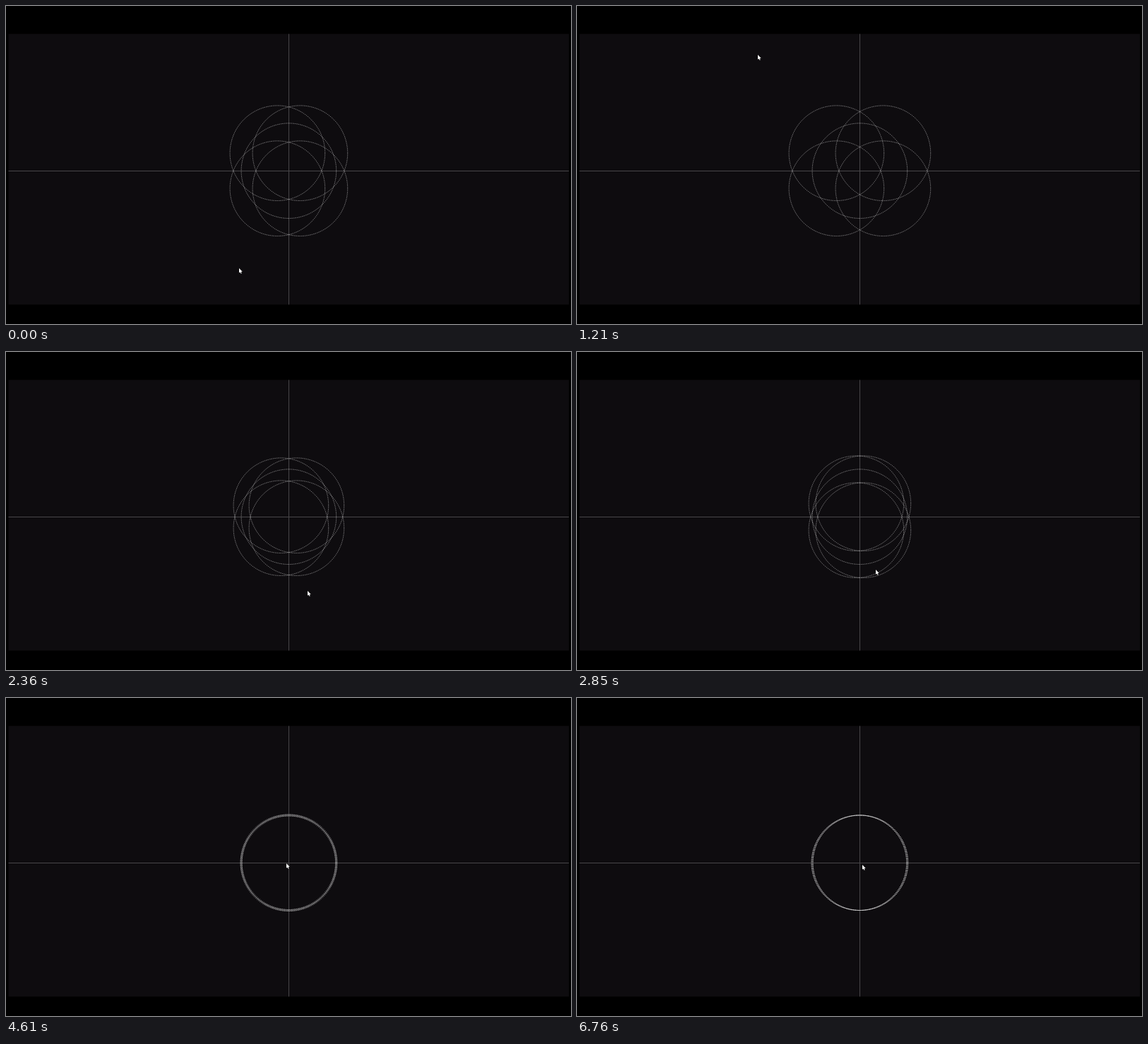
Animation of 800x450 px, one loop 6940 ms. Source, as an HTML page:

```html
<!DOCTYPE html>
<html lang="en">
<head>
<meta charset="utf-8">
<title>Circles following the pointer</title>
<style>
  html, body { margin: 0; width: 100%; height: 100%; overflow: hidden; background: #000; }
  svg { display: block; width: 100%; height: 100%; }
  .axis { stroke: #484649; stroke-width: 1; }
  .ring { fill: none; stroke: #fff; stroke-opacity: .52; stroke-width: .85; stroke-dasharray: 1.5 1; }
</style>
</head>
<body>
<svg viewBox="0 0 800 450">
  <rect x="3.5" y="39.5" width="793.5" height="383" fill="#0e0c0f"/>
  <path class="axis" d="M3.5 233.5H797M400.5 39.5V422.5"/>
  <g id="rings"></g>
  <path id="pointer" d="M0 0V6.8L1.6 5.4L2.6 7.8L3.7 7.3L2.8 5H4.8Z"
        fill="#fff" stroke="#000" stroke-width=".7" paint-order="stroke"/>
</svg>
<script>
const LOOP = 6940;
const STEP = 10;
const CENTER = { x: 400.4, y: 233.2 };
const RADIUS = 67.3;
const FOLLOW = 0.2;   // share of the pointer's distance from the center
const LAG = 150;      // ms

// time, x, y of the pointer
const path = [
  [0, 330, 371],
  [350, 308, 371],
  [600, 205, 353],
  [730, 190, 338],
  [900, 200, 225],
  [1050, 235, 85],
  [1200, 255, 69],
  [1450, 286, 75],
  [1640, 466, 120],
  [1820, 535, 190],
  [2180, 475, 318],
  [2360, 427, 338],
  [2750, 429, 333],
  [3050, 404, 240],
  [3330, 402, 190],
  [3600, 401, 189],
  [4350, 397, 234],
  [5390, 397, 234],
  [6080, 421, 236],
  [6650, 404, 236],
  [LOOP, 404, 236]
];

function slope(i, k) {
  const prev = path[i - 1], here = path[i], next = path[i + 1];
  if (!prev || !next) return 0;
  const before = here[k] - prev[k], after = next[k] - here[k];
  // flat at turning points, so that nothing overshoots
  return before * after <= 0 ? 0 : (before + after) / (next[0] - prev[0]);
}

function pointerAt(t) {
  const i = path.findIndex((point, n) => n < path.length - 1 && t < path[n + 1][0]);
  const a = path[i], b = path[i + 1];
  const span = b[0] - a[0], u = (t - a[0]) / span, v = 1 - u;
  const [x, y] = [1, 2].map(k =>
    v * v * (1 + 2 * u) * a[k] + u * u * (3 - 2 * u) * b[k]
    + span * u * v * (v * slope(i, k) - u * slope(i + 1, k)));
  return { x, y };
}

// The rings spread by an eased share of the pointer's offset.
const ease = 1 - Math.exp(-STEP / LAG);
const spreads = [{ x: -16, y: 25 }];
for (let t = STEP; t < LOOP; t += STEP) {
  const last = spreads[spreads.length - 1], p = pointerAt(t);
  spreads.push({
    x: last.x + ((p.x - 400) * FOLLOW - last.x) * ease,
    y: last.y + ((p.y - 233) * FOLLOW - last.y) * ease
  });
}

const signs = [[0, 0], [-1, -1], [1, -1], [-1, 1], [1, 1]];
const rings = signs.map(() => {
  const ring = document.createElementNS("http://www.w3.org/2000/svg", "circle");
  ring.setAttribute("class", "ring");
  ring.setAttribute("r", RADIUS);
  document.getElementById("rings").append(ring);
  return ring;
});
const pointer = document.getElementById("pointer");

function draw(t) {
  const p = pointerAt(t), spread = spreads[Math.floor(t / STEP)];
  const dx = Math.floor(spread.x), dy = Math.floor(spread.y);
  pointer.setAttribute("transform", `translate(${Math.round(p.x)} ${Math.round(p.y)})`);
  rings.forEach((ring, n) => {
    ring.setAttribute("cx", CENTER.x + signs[n][0] * dx);
    ring.setAttribute("cy", CENTER.y + signs[n][1] * dy);
  });
}

const start = performance.now();
function tick() {
  draw((performance.now() - start) % LOOP);
  requestAnimationFrame(tick);
}
tick();
</script>
</body>
</html>
```
